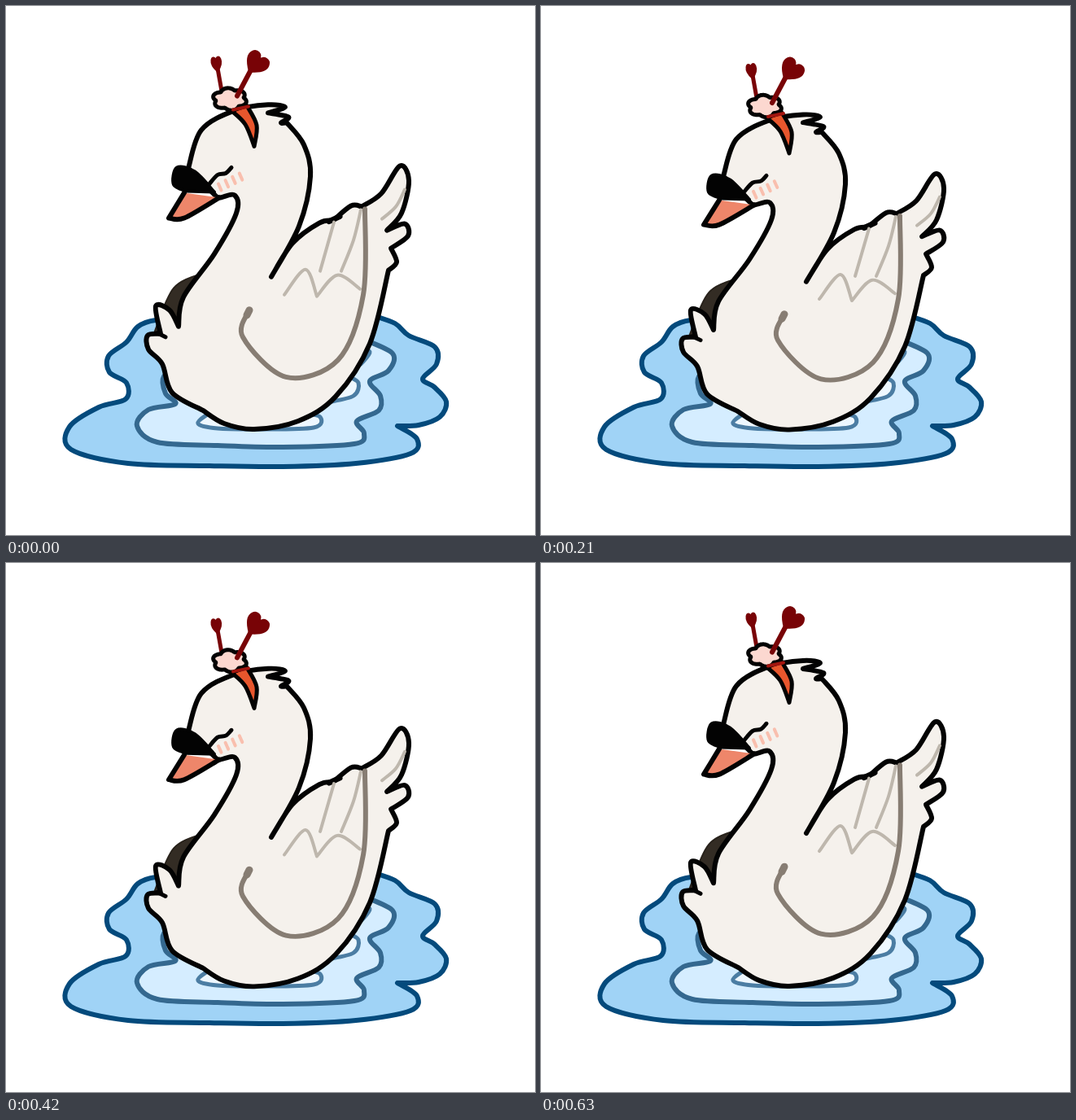
An HTML page with a canvas that plays this animation: 650x650 px, repeating every 0.7 s.

```html
<!DOCTYPE html>
<html lang="en">
<head>
<meta charset="utf-8">
<title>Swan on a pond</title>
<style>
html, body { margin: 0; width: 100%; height: 100%; overflow: hidden; background: #fff; }
canvas { display: block; }
</style>
</head>
<body>
<canvas id="stage" width="650" height="650"></canvas>
<script>
const ctx = document.getElementById("stage").getContext("2d");
const BLACK = "#030303", BODY = "#f5f1ec", WINE = "#780306";
const GREY = "#877d73", PALE = "#beb7ad", RIPPLE = "#4b7da3";
const STEP = 70, STEPS = 10, LOWEST = 4, WATERLINE = 540;

// Smooth curve through key points; "/" marks a corner.
function curve(text) {
  const path = new Path2D();
  let last = null;
  for (const part of text.split("/")) {
    const pts = part.trim().split(/\s+/).map(p => p.split(",").map(Number));
    if (last) pts.unshift(last);
    else path.moveTo(...pts[0]);
    for (let i = 0; i < pts.length - 1; i++) {
      const b = pts[i], c = pts[i + 1], a = pts[i - 1] || b, d = pts[i + 2] || c;
      path.bezierCurveTo(
        b[0] + (c[0] - a[0]) / 6, b[1] + (c[1] - a[1]) / 6,
        c[0] - (d[0] - b[0]) / 6, c[1] - (d[1] - b[1]) / 6, c[0], c[1]);
    }
    last = pts[pts.length - 1];
  }
  return path;
}

// Oval whose edge swells into a number of soft bumps.
function puff(x, y, rx, ry, bumps) {
  const path = new Path2D();
  for (let a = 0; a < 2 * Math.PI; a += .05) {
    const r = .86 + .2 * Math.abs(Math.sin(a * bumps / 2 + .5));
    path.lineTo(x + rx * r * Math.cos(a), y + ry * r * Math.sin(a));
  }
  path.closePath();
  return path;
}

// Heart standing on its tip, tilted clockwise by the angle in degrees.
function heart(x, y, width, height, angle) {
  const path = new Path2D();
  const unit = new Path2D("M0 0C-.5-.35-.6-.6-.5-.82C-.4-1.05-.05-1.05 0-.7C.05-1.05 .4-1.05 .5-.82C.6-.6 .5-.35 0 0");
  path.addPath(unit, new DOMMatrix().translate(x, y).rotate(angle).scale(width, height));
  return path;
}

const shape = (path, fill, stroke, width) => ({ path, fill, stroke, width });
const area = (text, fill, stroke, width) => shape(curve(text), fill, stroke, width);
const line = (text, stroke, width) => area(text, null, stroke, width);

const pond = [
  area(`210,388 184,386 162,394 148,413 126,430 127,450 148,463 147,483 114,493 78,517
    80,545 150,562 250,565 340,566 430,562 497,550 505,532 481,516
    / 507,515 533,505 541,486 526,468 512,458 529,440 527,419 495,405 478,390 450,380`,
    "#a0d3f6", "#044a7c", 6),
  area(`215,446 194,455 196,476 208,489 175,496 161,516 186,536 260,540 340,542 428,538
    440,525 431,510 458,497 460,479 447,461 470,448 475,427 440,410`,
    "#d5edff", "#34688f", 6),
  line("430,418 447,425 436,440", RIPPLE, 5),
  area("420,455 433,463 427,479 395,487", "#eef8ff", RIPPLE, 5),
  area("250,500 236,513 260,519 310,520 378,518 386,505 365,500", "#edf7ff", RIPPLE, 5)
];

const blush = [0, 1, 2, 3].map(i => {
  const x = 261 + i * 8.6, y = 219 - i * 4.3;
  return line(`${x},${y} ${x + 3.5},${y + 8}`, "#f9bfae", 4);
});

const swan = [
  area("244,328 206,347 182,402 / 212,398 / 244,328", "#332c24", "#28221b", 2),
  area(`326,333 360,271 374,210 366,171 345,144 / 338,144 347,137 322,132
    / 343,125 322,122 281,129 240,153 224,200 / 256,232
    / 262,236 281,233 283,255 256,305 218,358 212,394
    / 201,374 184,369 190,403 / 174,405 175,422 192,440 204,475 242,497
    / 268,513 305,520 359,510 405,480 447,415 470,325
    / 480,315 473,298 / 494,283 490,268 468,276
    / 486,255 495,215 484,197 461,231 437,247 / 424,246 402,264
    / 385,267 352,292 326,333`, BODY, BLACK, 6),
  area("326,333 354,286 / 326,333", BLACK, BLACK, 3),
  line("397,265 410,259", BLACK, 7),
  line("186,402 196,407", BLACK, 5),
  line("342,355 368,324 382,357 / 407,331 435,348", PALE, 4),
  line("403,266 386,326", PALE, 4),
  line("436,251 427,288 412,326", PALE, 4),
  line("490,226 479,247 462,262", PALE, 4),
  line("299,374 291,407 344,456 408,435 439,355 441,250", GREY, 6),
  line("299,374 296,380", GREY, 9),
  area("219,230 200,261 / 219,261 262,236", "#ee866a", BLACK, 6),
  area("256,229 232,204 210,199 206,220 222,228 / 256,229", BLACK, BLACK, 4),
  line("250,219 260,208 270,206 277,199", BLACK, 5),
  ...blush
];

const crown = [
  area("277,130 294,147 305,174 / 308,148 296,124 / 277,130", "#e8562d", BLACK, 5),
  line("265,106 260,78", WINE, 5),
  shape(puff(275, 116, 20, 13, 6), "#fcd8d0", BLACK, 5),
  line("279,129 298,125", "#a3150f", 4),
  line("284,112 302,78", WINE, 6),
  shape(heart(299, 82, 26, 26, 40), WINE, WINE, 2),
  shape(heart(260, 82, 11, 18, -8), WINE, WINE, 2)
];

function paint(shapes) {
  for (const { path, fill, stroke, width } of shapes) {
    if (fill) {
      ctx.fillStyle = fill;
      ctx.fill(path);
    }
    ctx.strokeStyle = stroke;
    ctx.lineWidth = width;
    ctx.stroke(path);
  }
}

function frame() {
  const step = Math.floor(performance.now() / STEP) % STEPS;
  const sink = (1 + Math.cos((step - LOWEST) / STEPS * 2 * Math.PI)) / 2;
  const stretch = 1.005 - .036 * sink;
  ctx.setTransform(1, 0, 0, 1, 0, 0);
  ctx.clearRect(0, 0, 650, 650);
  ctx.lineCap = ctx.lineJoin = "round";
  paint(pond);
  ctx.setTransform(1, 0, 0, stretch, 0, WATERLINE * (1 - stretch));
  paint(swan);
  ctx.setTransform(1, 0, 0, 1, 0, 10.5 * sink - 2.5);
  paint(crown);
  requestAnimationFrame(frame);
}
frame();
</script>
</body>
</html>
```
